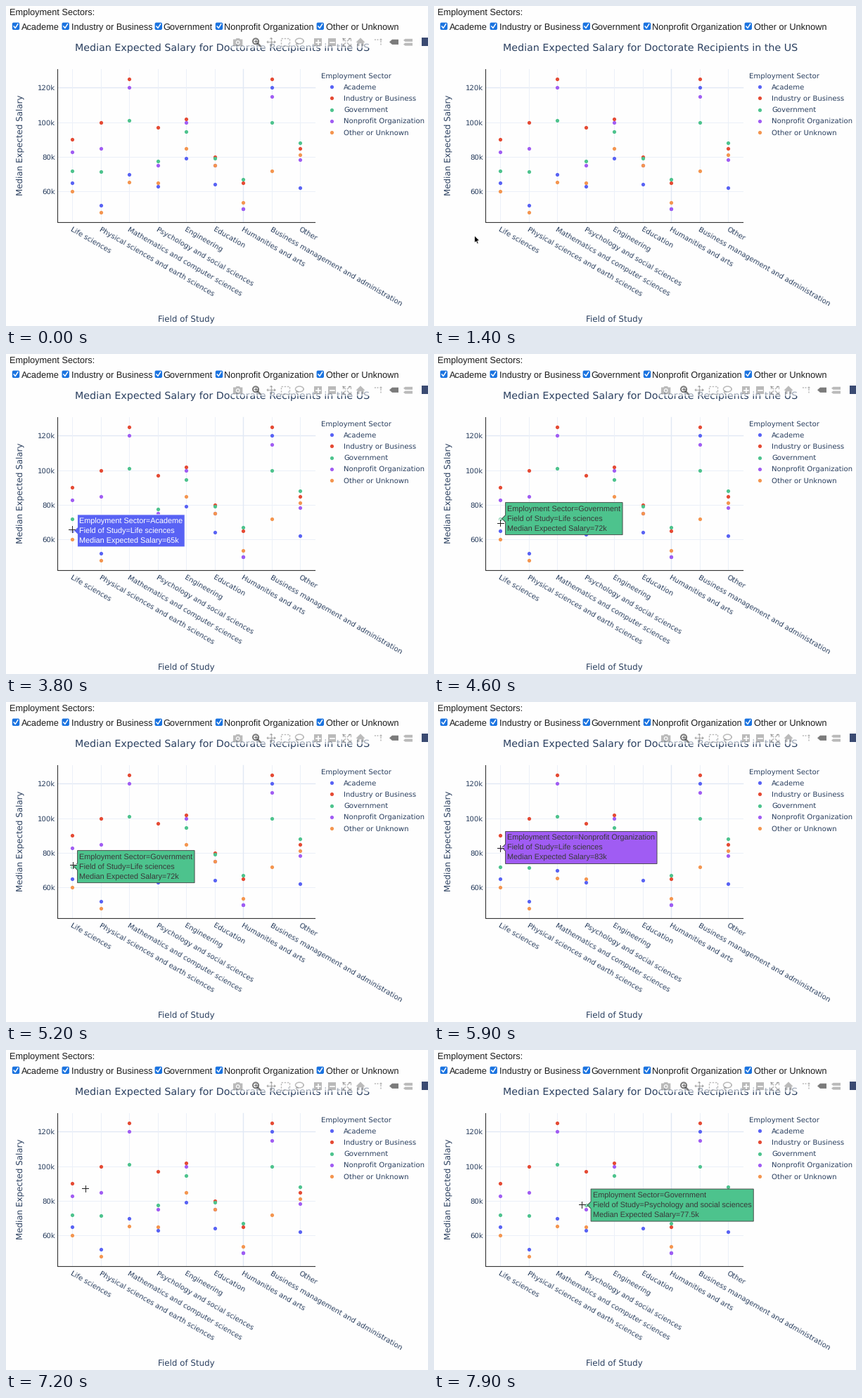
Recreate the animation shown at these times as a matplotlib script. Size 600 by 456 pixels, loop 8 s.

```python
import numpy as np
import matplotlib.pyplot as plt
from matplotlib.animation import FuncAnimation
from matplotlib.patches import Circle, FancyBboxPatch, Polygon, Rectangle

W, H, DPI = 600, 456, 96
PT = 72 / DPI  # points per pixel
FRAMES, STEP = 80, 100

plt.rcParams["text.hinting"] = "none"
plt.rcParams["toolbar"] = "None"

INK, DARK, GRID = "#2a3f5f", "#444444", "#ebf0f8"
PLOT = dict(left=72.5, right=439, top=90, bottom=307.5)

SECTORS = {
    "Academe": ("#5862f4", [65, 52, 70, 63, 79, 64, 50, 120, 62]),
    "Industry or Business": ("#e54a33", [90, 100, 125, 97, 102, 80, 65, 125, 85]),
    "Government": ("#4dc38d", [72, 71.6, 101, 77.5, 94.5, 79, 67, 100, 88]),
    "Nonprofit Organization": ("#a05cf3", [83, 85, 120, 75, 100, 75, 50, 115, 78.5]),
    "Other or Unknown": ("#f4954f", [60, 48, 65.5, 65, 85, 75, 53.7, 72, 81]),
}
FIELDS = ["Life sciences", "Physical sciences and earth sciences",
          "Mathematics and computer sciences", "Psychology and social sciences",
          "Engineering", "Education", "Humanities and arts",
          "Business management and administration", "Other"]

# pointer path: time in ms, x, y
PATH = np.array([
    (1000, 44, 470), (1400, 57.5, 327), (1900, 62, 318), (2400, 90, 272),
    (2800, 96.5, 264), (3400, 96.5, 264), (3600, 93.5, 249.5),
    (4500, 93.5, 249.5), (4700, 95, 232), (5500, 95, 232), (5700, 94, 208),
    (6200, 94, 208), (6500, 94.5, 193), (7100, 94.5, 193), (7500, 210, 220),
    (8000, 210, 220)])

fig = plt.figure(figsize=(W / DPI, H / DPI), dpi=DPI, facecolor="#fefefe")
ax = fig.add_axes([0, 0, 1, 1])
ax.set_xlim(0, W)
ax.set_ylim(H, 0)
ax.axis("off")


def field_x(i):
    return 94 + 40.5 * i


def salary_y(k):
    return 264.2 - (k - 60) * 2.465


def label(x, y, s, px, color=INK, font="DejaVu Sans", **kw):
    kw = {"ha": "left", "va": "baseline", "rotation_mode": "anchor", "zorder": 3, **kw}
    return ax.text(x, y, s, fontsize=px * PT, color=color, family=font, **kw)


def line(xs, ys, color, px, **kw):
    return ax.plot(xs, ys, color=color, lw=px * PT, **kw)[0]


def draw_filters():
    label(5, 13.6, "Employment Sectors:", 12.75, "#1c1c1c", "Liberation Sans")
    spots = [(14, 22), (84.7, 92.8), (216.8, 223.5), (303, 310.2), (446.8, 454.6)]
    for (bx, tx), name in zip(spots, SECTORS):
        ax.add_patch(FancyBboxPatch((bx - 3.2, 25.6), 6.4, 6.4, lw=0, fc="#1a73e0",
                                    boxstyle="round,pad=2,rounding_size=2"))
        line([bx - 2.8, bx - 0.8, bx + 2.8], [29, 31.5, 25.8], "white", 1.5)
        label(tx, 33.8, name, 12.75, "#1c1c1c", "Liberation Sans")


def draw_chart():
    left, right, top, bottom = PLOT.values()
    for k in (60, 80, 100, 120):
        y = salary_y(k)
        heavy = k == 120
        line([left, right], [y, y], "#e1e9f4" if heavy else GRID, 1.4 if heavy else 1, zorder=1)
        label(70, y + 3.8, f"{k}k", 10.1, ha="right")
    for i, name in enumerate(FIELDS):
        x = field_x(i)
        heavy = i == 6
        line([x, x], [top, bottom], "#e1e9f4" if heavy else GRID, 1.4 if heavy else 1, zorder=1)
        label(x - 2.6, 320, name, 10.1, rotation=-30)
    line([left, left, right], [top, bottom, bottom], "#333333", 1.1, zorder=2)

    label(307.5, 64.5, "Median Expected Salary for Doctorate Recipients in the US",
          14.3, ha="center")
    label(256, 449, "Field of Study", 11.85, ha="center")
    label(24, 198.5, "Median Expected Salary", 11.85, ha="center", rotation=90)

    label(448.3, 103, "Employment Sector", 10.1)
    size = (5.2 * PT) ** 2
    for i, (name, (color, values)) in enumerate(SECTORS.items()):
        y = 115.3 + 16.1 * i
        label(480, y + 3.7, name, 10.1)
        ax.scatter([463], [y], s=size, c=color, lw=0, zorder=4)
        ax.scatter(field_x(np.arange(9)), salary_y(np.array(values)),
                   s=size, c=color, lw=0, zorder=4)


class ModeBar:
    """Row of tool icons that fades in and out."""

    def __init__(self):
        self.parts = []
        self.build()

    def keep(self, artist, alpha):
        artist.set_zorder(6)
        self.parts.append((artist, alpha))

    def fill(self, patch, color=DARK, alpha=0.36):
        patch.set(facecolor=color, linewidth=0)
        self.keep(ax.add_patch(patch), alpha)

    def stroke(self, xs, ys, px=1.4, color=DARK, alpha=0.36, **kw):
        self.keep(line(xs, ys, color, px, **kw), alpha)

    def build(self):
        cy = 51.3
        self.fill(Rectangle((318, 43), 282, 17), "white", 0.55)
        # camera
        self.fill(Polygon([(323, 47.5), (326.5, 47.5), (327.5, 46), (332, 46),
                           (333, 47.5), (336.3, 47.5), (336.3, 57), (323, 57)]))
        self.fill(Circle((329.7, 52), 2.9), "white", 1)
        self.fill(Circle((329.7, 52), 1.7))
        # zoom, active
        a = np.linspace(0, 2 * np.pi, 40)
        self.stroke(355 + 4 * np.cos(a), 50.3 + 4 * np.sin(a), 2, alpha=0.7)
        self.stroke([358, 361.5], [53.3, 57], 2.4, alpha=0.7)
        self.stroke([353, 357], [50.3, 50.3], 1.2, alpha=0.7)
        self.stroke([355, 355], [48.3, 52.3], 1.2, alpha=0.7)
        # pan
        self.stroke([372, 382], [cy, cy])
        self.stroke([377, 377], [46.3, 56.3])
        for dx, dy in ((1, 0), (-1, 0), (0, 1), (0, -1)):
            tip = np.array([377 + 6.8 * dx, cy + 6.8 * dy])
            back, side = np.array([dx, dy]) * 2.6, np.array([dy, dx]) * 2.4
            self.fill(Polygon([tip, tip - back + side, tip - back - side]))
        # box select and lasso
        self.stroke([391, 403, 403, 391, 391], [46, 46, 57, 57, 46], 1.4, ls=(0, (1.8, 1.2)))
        self.stroke(417.3 + 5.8 * np.cos(a), 50 + 3.9 * np.sin(a), 1.5)
        self.stroke([413.5, 412.5, 414.5], [53, 55, 57.5], 1.4)
        # zoom in and out
        for x in (443.5, 463.5):
            self.fill(Rectangle((x - 5.5, 46), 11, 11))
            self.stroke([x - 3, x + 3], [cy + .2, cy + .2], 1.7, "white", 1)
        self.stroke([443.5, 443.5], [48.5, 54.5], 1.7, "white", 1)
        # autoscale
        for sx in (-1, 1):
            for sy in (-1, 1):
                self.stroke([484 + 1.5 * sx, 484 + 5 * sx],
                            [cy + 1.5 * sy, cy + 5 * sy], 1.5)
                self.stroke([484 + 2.5 * sx, 484 + 5.5 * sx, 484 + 5.5 * sx],
                            [cy + 5.5 * sy, cy + 5.5 * sy, cy + 2.5 * sy], 1.3)
        # home
        self.fill(Polygon([(497.5, 51.8), (504, 45.3), (510.5, 51.8), (508.6, 51.8),
                           (508.6, 57), (505.5, 57), (505.5, 53.3), (502.5, 53.3),
                           (502.5, 57), (499.4, 57), (499.4, 51.8)]))
        # spike lines
        self.stroke([524, 531], [48, 48], 1.6, ls=(0, (1.2, 1)))
        self.stroke([533, 533], [50, 57], 1.6, ls=(0, (1.2, 1)))
        self.fill(Circle((533, 48), 1.5))
        # closest and compare
        self.fill(Polygon([(545, 51.3), (549, 47.7), (558, 47.7), (558, 54.9), (549, 54.9)]),
                  alpha=0.7)
        for y in (46.8, 52.6):
            self.fill(Polygon([(565, y + 2), (567.5, y), (578, y), (578, y + 4), (567.5, y + 4)]))
        self.fill(Rectangle((591, 45), 12, 12), "#3a4a72", 1)

    def fade(self, level):
        for artist, alpha in self.parts:
            artist.set_alpha(alpha * level)


class Tooltip:
    def __init__(self):
        self.box = ax.add_patch(Polygon([(0, 0)] * 3, lw=0.9 * PT, zorder=8))
        self.halo = ax.add_patch(Circle((0, 0), 2.6, fc="white", alpha=0.4, lw=0, zorder=5))
        self.rows = [label(0, 0, "", 10.9, font="Liberation Sans", zorder=9) for _ in range(3)]

    def show(self, point):
        for part in (self.box, self.halo, *self.rows):
            part.set_visible(point is not None)
        if point is None:
            return
        sector, i = point
        color, values = SECTORS[sector]
        x, y = field_x(i), salary_y(values[i])
        light = sector == "Academe"
        texts = (f"Employment Sector={sector}", f"Field of Study={FIELDS[i]}",
                 f"Median Expected Salary={values[i]:g}k")
        for n, (row, s) in enumerate(zip(self.rows, texts)):
            row.set(text=s, position=(x + 10, y - 10.3 + 14 * n),
                    color="white" if light else "#383838")
        wide = max(r.get_window_extent().width for r in self.rows) * W / fig.bbox.width
        l, r, t, b = x + 7.6, x + 13 + wide, y - 23, y + 23
        self.box.set_xy([(x + 2.5, y), (l, y - 5), (l, t), (r, t), (r, b), (l, b), (l, y + 5)])
        self.box.set(facecolor=color, edgecolor="white" if light else DARK)
        self.halo.center = (x, y)


class Pointer:
    ARROW = np.array([(0, 0), (0, 10.8), (2.4, 8.5), (4, 12.2), (5.8, 11.4),
                      (4.2, 7.8), (7.5, 7.5)])

    def __init__(self):
        self.arrow = ax.add_patch(Polygon(self.ARROW, fc="black", ec="white",
                                          lw=0.9 * PT, zorder=12))
        self.cross = [line([], [], c, px, zorder=z)
                      for c, px, z in (("white", 2.2, 11), ("#222222", 1, 12))]

    def move(self, x, y, crossed, shown):
        self.arrow.set_visible(shown and not crossed)
        self.arrow.set_xy(self.ARROW + (x, y))
        for c in self.cross:
            c.set_visible(shown and crossed)
            c.set_data([x - 4.5, x + 4.5, np.nan, x, x], [y, y, np.nan, y - 4.5, y + 4.5])


def pointer_at(t):
    t = max(t, PATH[0, 0])
    k = min(np.searchsorted(PATH[:, 0], t, side="right") - 1, len(PATH) - 2)
    (t0, *p0), (t1, *p1) = PATH[k], PATH[k + 1]
    u = (t - t0) / (t1 - t0)
    return np.array(p0) + (np.array(p1) - p0) * u * u * (3 - 2 * u)


def nearest(x, y, reach=17):
    found = [(np.hypot(field_x(i) - x, salary_y(v) - y), name, i)
             for name, (_, values) in SECTORS.items() for i, v in enumerate(values)]
    dist, name, i = min(found)
    return (name, i) if dist < reach else None


draw_filters()
draw_chart()
bar, tip, pointer = ModeBar(), Tooltip(), Pointer()


def update(n):
    t = n * STEP
    x, y = pointer_at(t)
    inside = PLOT["left"] < x < PLOT["right"] and PLOT["top"] < y < PLOT["bottom"]
    bar.fade(np.interp(t, [200, 500, 1500, 1800], [1, 0, 0, 1]))
    tip.show(nearest(x, y) if inside else None)
    pointer.move(x, y, inside, t >= PATH[0, 0])
    return []


anim = FuncAnimation(fig, update, frames=FRAMES, interval=STEP, init_func=lambda: [],
                     repeat=True, repeat_delay=0, blit=False)
plt.show()
```
